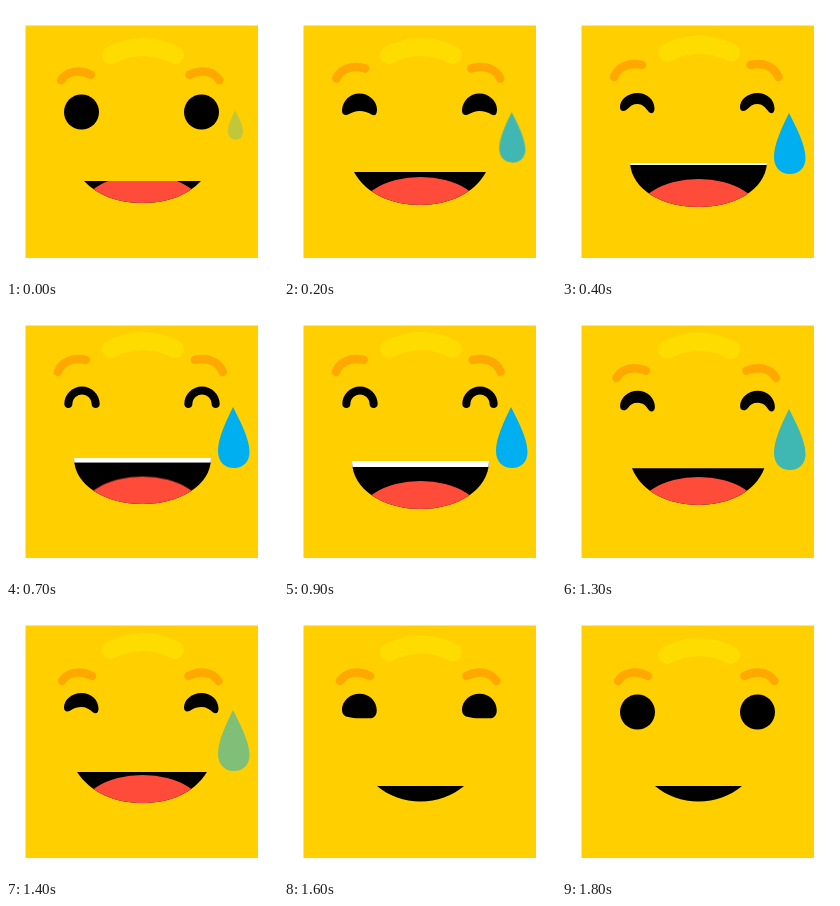
An HTML page without scripts that plays this animation: 272 by 272 pixels, repeating every 2500 ms.

```html
<!DOCTYPE html>
<html lang="en">
<head>
<meta charset="utf-8">
<title>Nervous laugh</title>
<style>
  html, body { margin: 0; width: 100%; height: 100%; overflow: hidden; background: #fff; }
  svg { display: block; width: 100%; height: 100%; }

  /* 25 ticks of 100 ms per loop: one tick is 4% */
  .shine, .brow, .eye, .mouth, .inner, .drop { animation: 2.5s step-end infinite; }

  .shine { fill: none; stroke: #ffdc00; stroke-width: 18; stroke-linecap: round; animation-name: shine; }
  .brow {
    d: path("M56 75C62 66 74 64 86 70");
    fill: none; stroke: #ffa800; stroke-width: 8.5; stroke-linecap: round;
    transform-origin: 71px 72.5px; animation-name: brow;
  }
  .eye { animation-name: eye; }
  .mouth { animation-name: mouth; }
  .inner { animation-name: inner, hide; }
  .drop { fill: #00afef; transform-origin: 231px 102px; animation-name: drop, fade; }

  @keyframes shine {
    0% { translate: 0 0; }
    8% { translate: 0 0; animation-timing-function: steps(5); }
    28% { translate: 0 -6px; }
    44% { translate: 0 -6px; animation-timing-function: steps(3); }
    56% { translate: 0 -5px; animation-timing-function: steps(4); }
    72%, 100% { translate: 0 0; }
  }

  @keyframes brow {
    0% { translate: -1px -1px; rotate: -1deg; animation-timing-function: steps(2); }
    8% { translate: -4.3px -5px; rotate: -10deg; animation-timing-function: steps(2); }
    16% { translate: -5px -7.5px; rotate: -14deg; animation-timing-function: steps(3); }
    28% { translate: -5.2px -12.5px; rotate: -14deg; }
    44% { translate: -5.2px -12.5px; rotate: -14deg; animation-timing-function: steps(3); }
    56%, 100% { translate: 0 0; rotate: 0deg; }
  }

  @keyframes eye {
    0% {
      d: path("M58 106C58 96.3 65.8 88.5 75.5 88.5C85.2 88.5 93 96.3 93 106C93 110.6 91.2 115.1 87.9 118.4C84.7 121.5 80.3 123.5 75.5 123.5C70.7 123.5 66.3 121.5 63.1 118.4C59.8 115.1 58 110.6 58 106Z");
      animation-timing-function: steps(2);
    }
    8% {
      d: path("M58 105C58 95.3 65.8 87.5 75.5 87.5C85.2 87.5 93 95.3 93 103.5C93 108.5 91 110.5 87.5 108.5C84 106.5 80 105 75.5 105C71 105 68 106.5 65 108C62 110 58 109 58 105Z");
      animation-timing-function: steps(2);
    }
    16% {
      d: path("M58 101C58 93.5 65.8 87 75.5 87C85.2 87 92.5 94 92.5 102.5C92.5 107.5 89 108.5 86.5 105.5C83.5 101.5 80 98 75.5 98C71 98 68.5 100 66 102.5C62 106.5 58 105.5 58 101Z");
      animation-timing-function: steps(3);
    }
    28%, 44% {
      d: path("M58.3 98C58.3 88.3 66.2 80.4 76 80.4C85.8 80.4 93.7 88.3 93.7 98C93.7 103.3 85.6 103.3 85.6 98C85.6 92.7 81.3 88.4 76 88.4C70.7 88.4 66.4 92.7 66.4 98C66.4 103.3 58.3 103.3 58.3 98Z");
      animation-timing-function: steps(3);
    }
    56% {
      d: path("M58 101.5C58 94 65.8 87 75.5 87C85.2 87 92.5 94 92.5 102.5C92.5 107.5 89.5 108.5 86.5 106C83.5 103 80 101 75.5 101C71 101 68.5 102 66 103.5C62 106.5 58 106 58 101.5Z");
      animation-timing-function: steps(4);
    }
    72%, 100% {
      d: path("M58 106C58 96.3 65.8 88.5 75.5 88.5C85.2 88.5 93 96.3 93 106C93 110.6 91.2 115.1 87.9 118.4C84.7 121.5 80.3 123.5 75.5 123.5C70.7 123.5 66.3 121.5 63.1 118.4C59.8 115.1 58 110.6 58 106Z");
    }
  }

  @keyframes mouth {
    0% {
      d: path("M78 175C92 190 113 197 136.5 197C160 197 181 190 195 175Z");
      animation-timing-function: steps(2);
    }
    8% {
      d: path("M70 166C82 188 108 199 136 199C164 199 190 188 202 166Z");
      animation-timing-function: steps(2);
    }
    16% { d: path("M68 157C70 184 100 201 136.5 201C173 201 203 184 205 157Z"); }
    20% {
      d: path("M68 156C68 184 100 203 136.5 203C173 203 205 184 205 156Z");
      animation-timing-function: steps(2);
    }
    28% {
      d: path("M68 152C68 180 100 198 136.5 198C173 198 205 180 205 152Z");
      animation-timing-function: steps(2);
    }
    36%, 44% {
      d: path("M68 155C68 184 100 203 136.5 203C173 203 205 184 205 155Z");
      animation-timing-function: steps(3);
    }
    56% {
      d: path("M71 166C86 188 110 197 136.5 197C163 197 187 188 201 166Z");
      animation-timing-function: steps(2);
    }
    64%, 100% { d: path("M93 180C105 190 120 195.5 136.5 195.5C153 195.5 168 190 180 180Z"); }
  }

  @keyframes inner {
    0% { translate: 0 -6px; animation-timing-function: steps(2); }
    8% { translate: 0 -4px; animation-timing-function: steps(2); }
    16% { translate: 0 -2px; }
    20% { translate: 0 -1px; animation-timing-function: steps(2); }
    28% { translate: 0 -4.5px; animation-timing-function: steps(2); }
    36%, 44% { translate: 0 0; animation-timing-function: steps(3); }
    56%, 100% { translate: 0 -6px; }
  }
  @keyframes hide {
    0% { opacity: 1; }
    64%, 100% { opacity: 0; }
  }

  @keyframes drop {
    0% { translate: 0 0; scale: .48; animation-timing-function: steps(3); }
    12% { translate: 0 0; scale: 1; }
    16% { translate: 0 0; scale: 1; animation-timing-function: steps(3); }
    28%, 44% { translate: 0 -6px; scale: 1; animation-timing-function: steps(3); }
    56%, 100% { translate: 0 -3px; scale: 1; }
  }
  @keyframes fade {
    0% { opacity: .25; animation-timing-function: steps(3); }
    12% { opacity: 1; }
    48% { opacity: 1; animation-timing-function: steps(4); }
    64%, 100% { opacity: 0; }
  }
</style>
</head>
<body>
<svg viewBox="0 0 272 272">
  <clipPath id="lips"><path class="mouth"/></clipPath>

  <rect x="19.5" y="19.5" width="232.5" height="232.5" fill="#ffcf00"/>
  <path class="shine" d="M105 49Q137 33 169 49"/>

  <path class="brow"/>
  <g transform="translate(268.5) scale(-1 1)"><path class="brow"/></g>

  <path class="eye"/>
  <g transform="translate(120)"><path class="eye"/></g>

  <path class="mouth"/>
  <g clip-path="url(#lips)">
    <g class="inner">
      <rect x="60" y="130" width="154" height="31" fill="#fff"/>
      <ellipse cx="136.5" cy="216" rx="65" ry="41" fill="#ff4b3a"/>
    </g>
  </g>

  <path class="drop" d="M227 107C233 119 243.5 138 243.5 152C243.5 162 237 168 228 168C219 168 212 162 212 151C212 138 220 121 227 107Z"/>
</svg>
</body>
</html>
```
